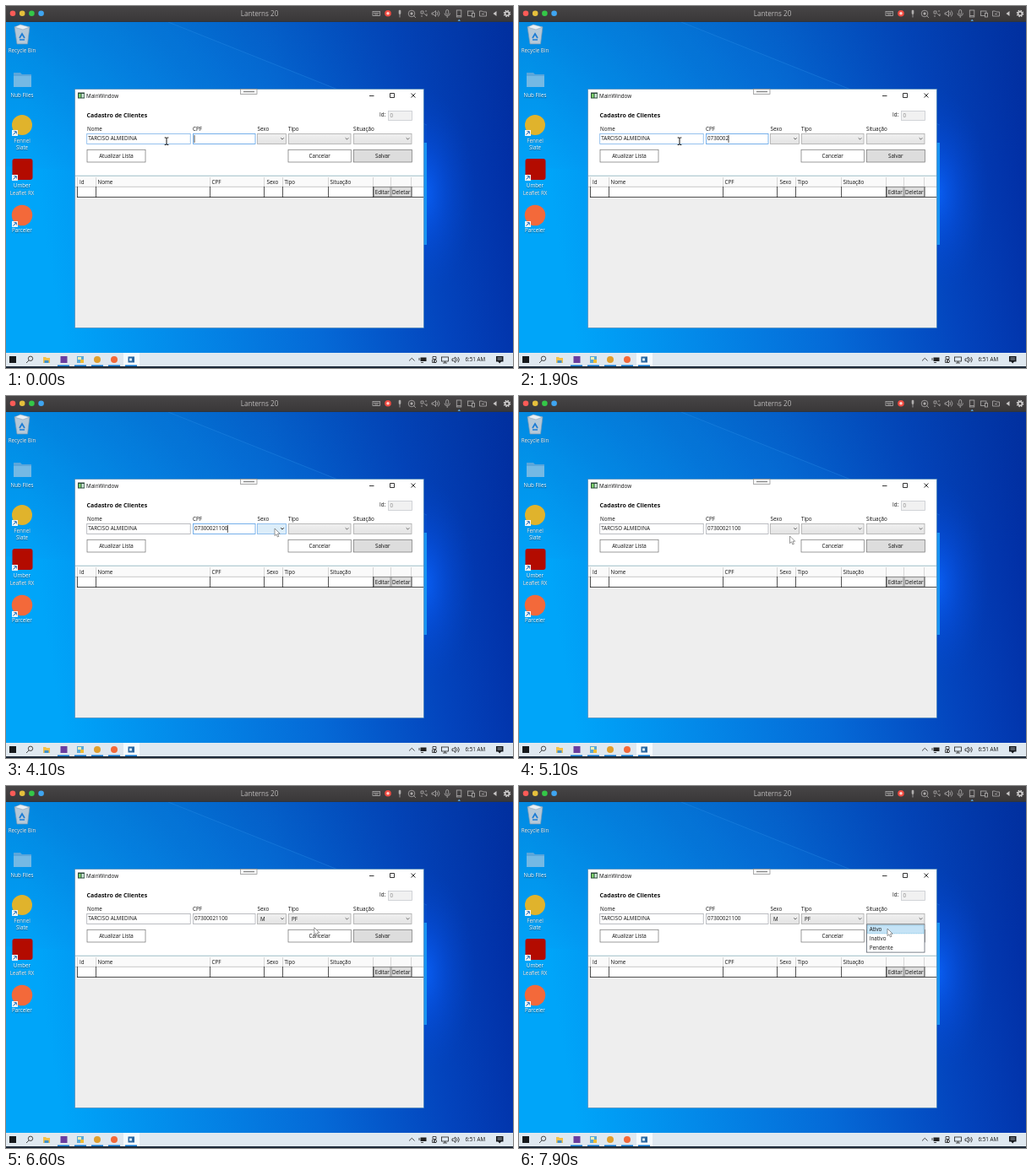
An HTML page that plays this animation: 600 by 429 pixels, repeating every 8000 ms.

```html
<!DOCTYPE html>
<html lang="pt">
<head>
<meta charset="utf-8">
<style>
html, body { margin: 0; width: 100%; height: 100%; overflow: hidden; background: #0763cf; }
svg { display: block; width: 600px; height: 429px; }
text { font: 6.25px "Open Sans", "Noto Sans", sans-serif; fill: #111; white-space: pre; }
.label { fill: #fff; text-anchor: middle; text-shadow: 0 .5px 1px #0008; }
.mid { text-anchor: middle; }
.line { fill: none; stroke: #b0aeae; stroke-width: .8; }
.tray { fill: none; stroke: #222; stroke-width: .8; }
</style>
</head>
<body>
<svg viewBox="0 0 600 429">
  <defs>
    <linearGradient id="sky" x2="1" y2="-.12">
      <stop offset="0" stop-color="#00a5f9"/>
      <stop offset=".22" stop-color="#038bea"/>
      <stop offset=".5" stop-color="#056ad7"/>
      <stop offset=".75" stop-color="#0344bd"/>
      <stop offset="1" stop-color="#01279c"/>
    </linearGradient>
    <linearGradient id="shade" x2="0" y2="1">
      <stop offset="0" stop-color="#02409f" stop-opacity=".3"/>
      <stop offset=".45" stop-color="#02409f" stop-opacity="0"/>
    </linearGradient>
    <radialGradient id="glow">
      <stop offset="0" stop-color="#0a62fa" stop-opacity=".9"/>
      <stop offset=".45" stop-color="#0753e6" stop-opacity=".45"/>
      <stop offset="1" stop-color="#0344c4" stop-opacity="0"/>
    </radialGradient>
    <linearGradient id="combo" x2="0" y2="1">
      <stop offset="0" stop-color="#f0f0f0"/><stop offset="1" stop-color="#e3e3e3"/>
    </linearGradient>
    <linearGradient id="bar" x2="0" y2="1">
      <stop offset="0" stop-color="#474546"/><stop offset="1" stop-color="#393738"/>
    </linearGradient>
  </defs>
  <g id="scene"></g>
  <g id="live"></g>
</svg>
<script>
const $ = id => document.getElementById(id);
const rect = (x, y, w, h, fill, stroke, more = '') =>
  `<rect x="${x}" y="${y}" width="${w}" height="${h}" fill="${fill}" stroke="${stroke || 'none'}" ${more}/>`;
const dot = (x, y, r, fill) => `<circle cx="${x}" cy="${y}" r="${r}" fill="${fill}"/>`;
const path = (d, attrs = '') => `<path d="${d}" ${attrs}/>`;
const text = (x, y, s, attrs = '') => `<text x="${x}" y="${y}" ${attrs}>${s}</text>`;
const button = (x, y, w, h, s, fill) =>
  rect(x, y, w, h, fill, '#707070', 'stroke-width=".7"') + text(x + w / 2, y + h / 2 + 2.3, s, 'class="mid"');

function desktop() {
  const badge = y => rect(7, y, 7, 7, '#f4f4f4') +
    path(`M8.5 ${y + 5.5}L12 ${y + 2}M9.5 ${y + 1.7}H12.3V${y + 4.5}`, 'fill="none" stroke="#1667b7"');
  const label = (y, ...rows) => rows.map((s, i) => text(19, y + i * 8.5, s, 'class="label"')).join('');
  return rect(0, 0, 600, 429, 'url(#sky)') + rect(0, 0, 600, 429, 'url(#shade)') +
    path('M192 19L498 141V220L0 190V19Z', 'fill="#0a86ea" opacity=".1"') +
    path('M192 19L498 141', 'stroke="#2f92ea" stroke-width="1" opacity=".35"') +
    '<ellipse cx="494" cy="222" rx="62" ry="125" fill="url(#glow)"/>' +
    rect(470, 162, 28, 121, '#1893f2') +
    // bin
    path('M10 25L28 25L25.5 45H13Z', 'fill="#b4c8d8" stroke="#7f9ab0" stroke-width=".7"') +
    path('M10 25L17 22L28 25L20 28Z', 'fill="#e9eff4" stroke="#8fa5b6" stroke-width=".6"') +
    path('M16 38L19 33L22 38M22 40H16', 'fill="none" stroke="#1c7cd5" stroke-width="1.7"') +
    label(54.5, 'Recycle Bin') +
    // folder
    path('M9 79H17L19 81H30V96H9Z', 'fill="#5ba6da"') + rect(9, 83, 21, 13, '#74b9e4') +
    label(108, 'Nub Files') +
    dot(19, 141, 12, '#e0b32c') + badge(147) + label(161.5, 'Fennel', 'Slate') +
    rect(7.5, 181, 24, 25, '#b30b00', '', 'rx="3"') + badge(200) + label(215, 'Umber', 'Leaflet RX') +
    dot(19, 248, 12.3, '#f3693a') + badge(255) + label(268, 'Parceler');
}

function topBar() {
  const lights = ['#fc5b57', '#e5bf3c', '#34c748', '#3fa4f0'];
  return rect(0, 0, 600, 19, 'url(#bar)') + rect(0, 18.2, 600, .8, '#2b3340') +
    lights.map((c, i) => dot(8 + i * 11.2, 8.7, 3.3, c)).join('') +
    text(300, 12.2, 'Lanterns 20', 'class="mid" style="font-size:8.1px;fill:#bcbaba"') +
    '<g class="line">' +
    rect(434, 6.5, 8.5, 5, 'none', '#b0aeae') + path('M435 8.3h6.5M436 10h4.5') +
    path('M466 9V13.5') + rect(464.7, 4.7, 2.6, 5, '#b0aeae', '', 'rx="1"') +
    '<circle cx="480" cy="9" r="3.8"/>' + dot(480, 9, 1.2, '#b0aeae') + path('M482 11l3 3') +
    path('M491 6h3v3h-3zM496 6h2M491 12h2M495 9l3 3v-3') +
    path('M504 8h2l2.5-2.5v7L506 10h-2zM510 7q1.5 2 0 4M511.5 5.5q3 3.5 0 7') +
    rect(520.7, 4.5, 3, 5.5, 'none', '#b0aeae', 'rx="1.5"') + path('M519 8.5q0 3.2 3.2 3.2T525.5 8.5M522.2 12v2') +
    rect(533.3, 5, 5.5, 8, 'none', '#b0aeae') + path('M533.5 11.5h5') +
    rect(546.5, 6, 6.5, 5.5, 'none', '#b0aeae') + rect(551.5, 8.5, 3, 4.5, '#403e3f', '#b0aeae') +
    path('M560.5 12V6h3l1 1h4v5zM563 9.5h3') + '</g>' +
    dot(452, 8.8, 3.8, '#f04b42') + dot(452, 8.8, 1.7, '#ffd5d0') +
    path('M534.5 17.7L536.2 15.8L538 17.7Z', 'fill="#65b4ee"') +
    path('M580.5 6V12L576.5 9Z', 'fill="#c8c6c6"') +
    '<circle cx="593" cy="9" r="3.4" fill="none" stroke="#d0cece" stroke-width="1.8" stroke-dasharray="1.5 1.17"/>' +
    '<circle cx="593" cy="9" r="2.3" fill="none" stroke="#d0cece" stroke-width="1.5"/>';
}

function taskbar() {
  const runs = [68, 88, 108, 128, 148].map(x => rect(x - 7, 425.5, 14, 1.5, '#0b74cd')).join('');
  return rect(0, 411, 600, 16, '#dfe8f0') + rect(0, 427, 600, 2, '#1d2a38') +
    rect(139, 411, 19, 16, '#f6fafd') + runs +
    rect(4, 415, 8, 8, '#16191d') +
    '<g class="tray"><circle cx="29" cy="417.8" r="2.7"/><path d="M27 420l-3 3"/></g>' +
    path('M44 416h3l1 1h4v6h-8z', 'fill="#f3c04b"') + rect(45.5, 420, 5, 3, '#3d91cd') +
    rect(64.5, 415, 8, 8, '#6b3fa0') +
    rect(84, 415, 8, 8, '#5aa9d6') + rect(85, 416, 4, 3, '#f8efb2') + rect(88, 419, 4, 4, '#f0bd35') +
    dot(108, 419, 4, '#de9f2f') + dot(128, 419, 4, '#f3693a') +
    rect(144.5, 415.5, 7.5, 7, '#2b67a0') + rect(146, 417.5, 3, 3, '#dbeef8') +
    '<g class="tray">' +
    path('M477 420.5l3.3-3.2 3.3 3.2') +
    rect(490.5, 416.5, 7, 4.5, '#222') + path('M489 417v3M491 422.5h3') +
    path('M505 415.5h4v3h-4zM504.5 419v3.5h4.5M507 419v3') + '<circle cx="508" cy="421" r="1.6"/>' +
    rect(515.5, 416, 8, 5, 'none', '#222') + path('M517 423h5M519.5 421v2') +
    path('M528 418h1.6l2.3-2v6.5l-2.3-2H528zM533.5 417.5q1.3 1.6 0 3.4M535 416q2.7 3 0 6.3') + '</g>' +
    text(543.5, 421.3, '6:51 AM') +
    path('M580 415h8.5v6.5H586l-1.8 2-1.8-2H580z', 'fill="#16191d"') +
    path('M581.5 417h5.5M581.5 419h5.5', 'stroke="#d5dfe8" stroke-width=".7"');
}

function appWindow() {
  const heads = [[87, 'Id'], [108.5, 'Nome'], [243.5, 'CPF'], [308.5, 'Sexo'], [329.5, 'Tipo'], [383.5, 'Situação']];
  const labels = [[96, 'Nome'], [221, 'CPF'], [297.5, 'Sexo'], [334, 'Tipo'], [411, 'Situação']];
  const cols = [106.5, 241.5, 305.5, 327.5, 381.5, 434.5];
  return rect(81.5, 98.5, 412.8, 283, '#fff', '#4d86b4', 'stroke-width=".7"') +
    rect(85, 102.5, 8, 7, '#2c4a3c') + rect(86, 104, 2.6, 4.5, '#7ed36b') + rect(89.5, 104, 2.8, 4.5, '#cfe8d8') +
    text(95, 108.6, 'MainWindow') +
    rect(277.5, 98.5, 19.5, 6, '#f6f6f6', '#8b8b8b', 'stroke-width=".7"') +
    path('M281 101.5h13', 'stroke="#888" stroke-width="1.3"') +
    path('M430 106.5h5.5M454.5 103.5h5v5h-5zM479.5 103.5l5 5M484.5 103.5l-5 5', 'fill="none" stroke="#222" stroke-width=".9"') +
    text(95.5, 131.5, 'Cadastro de Clientes', 'style="font-weight:700;font-size:7.03px"') +
    text(442, 131, 'Id:') + rect(452.5, 124.5, 28, 11, '#f1f1f1', '#c9cbd0', 'stroke-width=".8"') +
    text(454.5, 132, '0', 'style="fill:#888"') +
    labels.map(([x, s]) => text(x, 147.6, s)).join('') +
    button(96, 170.3, 69, 14.7, 'Atualizar Lista', '#fff') +
    button(334, 170.3, 74.3, 14.7, 'Cancelar', '#fff') +
    button(411.3, 170.3, 69, 14.7, 'Salvar', '#ddd') +
    rect(82, 201, 412, 180, '#eee') + path('M82 201.2H494', 'stroke="#8fb6c2" stroke-width=".8"') +
    rect(82, 202, 412, 12, '#fafafa') + rect(84, 214, 410, 12, '#fff') + rect(82, 214, 2.5, 12, '#eee') +
    path([84.5, ...cols, 455.5, 479.5].map(x => `M${x} 203V214`).join(''), 'stroke="#cfcfcf" stroke-width=".8"') +
    path('M82 214.3H494', 'stroke="#b0b0b0" stroke-width=".7"') +
    heads.map(([x, s]) => text(x, 210.7, s)).join('') +
    button(435.5, 214.5, 19.5, 11.5, 'Editar', '#ddd') + button(456, 214.5, 23.5, 11.5, 'Deletar', '#ddd') +
    path('M84.5 214V227M84 226.5H494' + cols.map(x => `M${x} 214V227`).join(''), 'fill="none" stroke="#1c1c1c" stroke-width=".75"') +
    path('M480.3 214V226', 'stroke="#333" stroke-width=".6"');
}

const LOOP = 8000, KEY_GAP = 250, FIRST_KEY = 350, TAB_OUT = 4400;
const CPF = '07300021100';

// time, x, y of the pointer's tip
const route = [
  [0, 190, 160], [3400, 190, 160], [4100, 318, 157], [4600, 320, 158], [4800, 320.5, 166], [5200, 320.5, 166],
  [5700, 356, 158], [6000, 357, 161.5], [6200, 357, 169], [6500, 357, 169],
  [7000, 432, 157], [7100, 433, 156.5], [7300, 433, 157], [7600, 436, 169], [8000, 436, 169]
];
const combos = [
  { x: 297.5, w: 34, items: ['M', 'F'], open: 4500, close: 5100, set: 5200 },
  { x: 334.5, w: 73.5, items: ['PF', 'PJ'], open: 5800, close: 6500, set: 6500 },
  { x: 411.5, w: 68.5, items: ['Ativo', 'Inativo', 'Pendente'], open: 7300, close: 9000, set: 9000 }
];

function pointer(t) {
  const i = route.findIndex(p => p[0] > t);
  const [t0, x0, y0] = route[i - 1], [t1, x1, y1] = route[i];
  const u = (t - t0) / (t1 - t0), e = u * u * (3 - 2 * u);
  return [x0 + (x1 - x0) * e, y0 + (y1 - y0) * e];
}

function combo(c, t, mx, my) {
  const hover = mx > c.x && mx < c.x + c.w && my > 151 && my < 164;
  const box = rect(c.x, 151.5, c.w, 12, hover ? '#dcedf9' : 'url(#combo)', hover ? '#7eb4ea' : '#acacac', 'stroke-width=".8"') +
    path(`M${c.x + c.w - 6.3} 156.3l1.8 1.8 1.8-1.8`, `fill="none" stroke="${hover ? '#111' : '#555'}" stroke-width=".9"`) +
    (t >= c.set ? text(c.x + 3.5, 159.8, c.items[0]) : '');
  if (t < c.open || t >= c.close) return box;
  const rows = c.items.map((s, i) => {
    const y = 164.7 + i * 10.7;
    const mark = my >= y && my < y + 10.7
      ? rect(c.x + 1, y + .3, c.w - 2, 9.8, '#c5e3f6', '#58b1dc', 'stroke-width=".8" stroke-dasharray="1 1"') : '';
    return mark + text(c.x + 3.2, y + 7.5, s);
  });
  return box + rect(c.x, 164, c.w, c.items.length * 10.7 + 1, '#fff', '#5d6570', 'stroke-width=".8"') + rows.join('');
}

function cursor(x, y) {
  if (x < 295 && y < 164)
    return path(`M${x - 2.3} ${y - 4}h1.6l.7.7.7-.7h1.6M${x} ${y - 3.5}v7.5M${x - 2.3} ${y + 4.5}h1.6l.7-.7.7.7h1.6`,
      'fill="none" stroke="#111" stroke-width="1"');
  return path(`M${x} ${y}v8.6l2-1.8 1.4 3.2 1.5-.7-1.4-3.1h2.7z`, 'fill="#fff" stroke="#555" stroke-width=".6"');
}

function draw(t) {
  const [mx, my] = pointer(t);
  const over = (x, w) => mx > x && mx < x + w && my < 164;
  const field = (x, w, focus, s) =>
    rect(x, 151.5, w, 12, '#fff', focus ? '#569de5' : over(x, w) ? '#7eb4ea' : '#abadb3', 'stroke-width=".8"') +
    text(x + 1.5, 159.3, s);
  const typed = Math.max(0, Math.min(CPF.length, Math.floor((t - FIRST_KEY) / KEY_GAP) + 1));
  const lastKey = typed ? FIRST_KEY + (typed - 1) * KEY_GAP : 0;
  const focus = t < TAB_OUT;
  const caret = focus && (t - lastKey) % 1060 < 530;
  const caretX = 223 + typed * 3.575;
  $('live').innerHTML =
    field(95.7, 122.5, false, 'TARCISO ALMEDINA') + field(221.5, 73.5, focus, CPF.slice(0, typed)) +
    (caret ? path(`M${caretX} 153V162`, 'stroke="#222" stroke-width=".8"') : '') +
    combos.map(c => combo(c, t, mx, my)).join('') + cursor(mx, my);
}

$('scene').innerHTML = desktop() + topBar() + appWindow() + taskbar();
let shown = -1;
const start = performance.now();
function tick() {
  const t = Math.floor((performance.now() - start) % LOOP / 100) * 100;
  if (t !== shown) draw(shown = t);
  requestAnimationFrame(tick);
}
tick();
</script>
</body>
</html>
```
